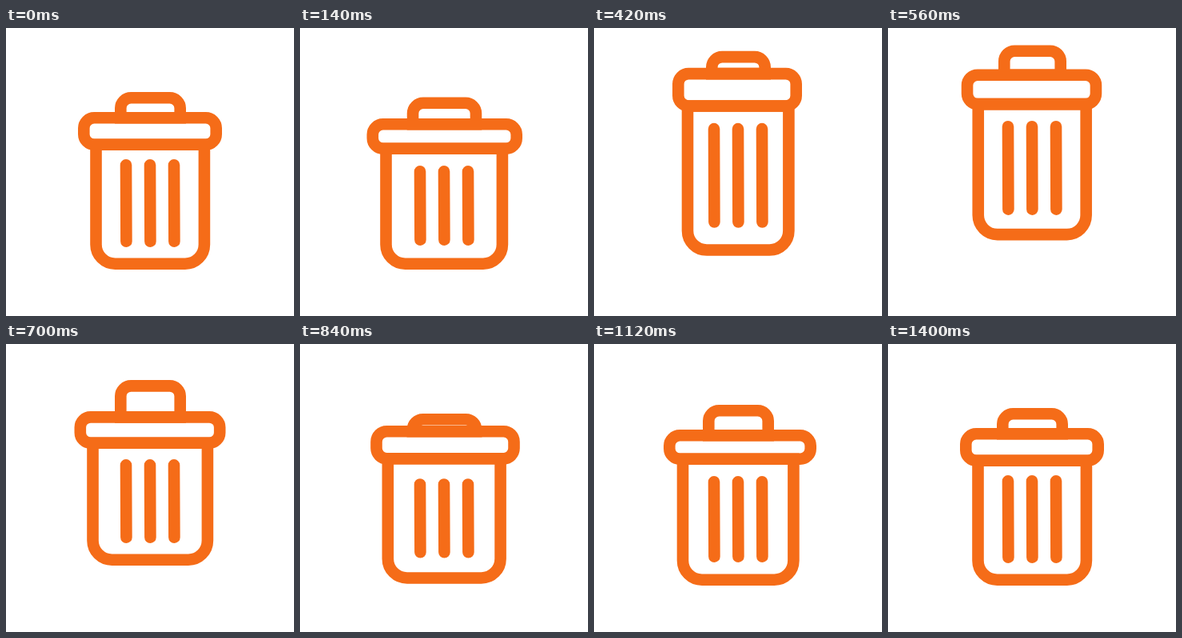
Recreate the animation shown at these times as an HTML page with a canvas. Size 360 px wide and 360 px high, loop 1.47 s.

```html
<!DOCTYPE html>
<html lang="en">
<head>
<meta charset="utf-8">
<title>Bouncing bin</title>
<style>
html, body { margin: 0; width: 100%; height: 100%; overflow: hidden; background: #fff; }
canvas { display: block; }
</style>
</head>
<body>
<canvas width="360" height="360"></canvas>
<script>
const ctx = document.querySelector('canvas').getContext('2d');
const STEP = 70, STEPS = 21, LINE = 14.6, HALF = LINE / 2;

const ease = u => (1 - Math.cos(Math.PI * Math.min(1, Math.max(0, u)))) / 2;

// Rises smoothly from 0 to 1 at the peak, then falls back to 0.
const swell = (t, from, peak, to) =>
  t < peak ? ease((t - from) / (peak - from)) : ease((to - t) / (to - peak));

function box(centre, half, top, bottom, radii) {
  ctx.beginPath();
  ctx.roundRect(centre - half + HALF, top + HALF, 2 * half - LINE, bottom - top - LINE, radii);
  ctx.stroke();
}

function draw(t) {
  // The phases of the hop
  const crouch = swell(t, 0, 4, 6);
  const stretch = swell(t, 4, 6, 10);
  const float = swell(t, 6, 10, 14);
  const fall = swell(t, 10, 12, 14);
  const land = swell(t, 11.5, 14, 18);
  const rebound = swell(t, 13, 16, 20);
  const lift = 37 * swell(t, 3.9, 8.3, 12.7);

  const bottom = 302 - lift;
  const bodyHalf = 75 + 10 * crouch - 4.5 * stretch + 4 * float + 7 * land - 2 * rebound;
  const height = 197 - 16 * crouch + 38 * stretch - 4 * float + 4 * fall - 12 * land + 4 * rebound;

  const lidX = 180 + 1.5 * crouch - stretch + 1.5 * fall + 2.5 * rebound;
  const lidHalf = 90 + 14.5 * crouch - 9 * stretch + 4.5 * float + 11 * land;
  const lidTop = bottom - height;
  const lidBottom = lidTop + 48 - 6 * crouch + 7 * stretch - float + 2 * fall - 8 * land;

  const handleHalf = 44.5 + 4.5 * crouch - 4 * stretch + 2.5 * fall;
  const handleTop = lidTop - 25 - 3 * crouch + 4 * stretch - 14 * float + 17 * fall - 6 * rebound;

  const barTop = lidBottom + 11 + 6 * crouch + 3 * stretch + 2 * float + 5 * fall + 6 * land;
  const barBottom = bottom - 28 - 4 * crouch - 7 * stretch - 4 * fall - 2 * land;

  ctx.clearRect(0, 0, 360, 360);
  ctx.strokeStyle = '#f56c18';
  ctx.lineWidth = LINE;
  ctx.lineCap = 'round';

  box(180.2, bodyHalf, lidBottom - LINE, bottom, [0, 0, 24, 24]);
  box(180.5, handleHalf, handleTop, lidTop + LINE, [13, 13, 0, 0]);
  box(lidX, lidHalf, lidTop, lidBottom, 13);
  for (const x of [150, 180, 210]) {
    ctx.beginPath();
    ctx.moveTo(x, barTop + HALF);
    ctx.lineTo(x + 0.4, barBottom - HALF);
    ctx.stroke();
  }
}

const start = performance.now();
function tick() {
  draw(Math.floor((performance.now() - start) / STEP) % STEPS);
  requestAnimationFrame(tick);
}
tick();
</script>
</body>
</html>
```
